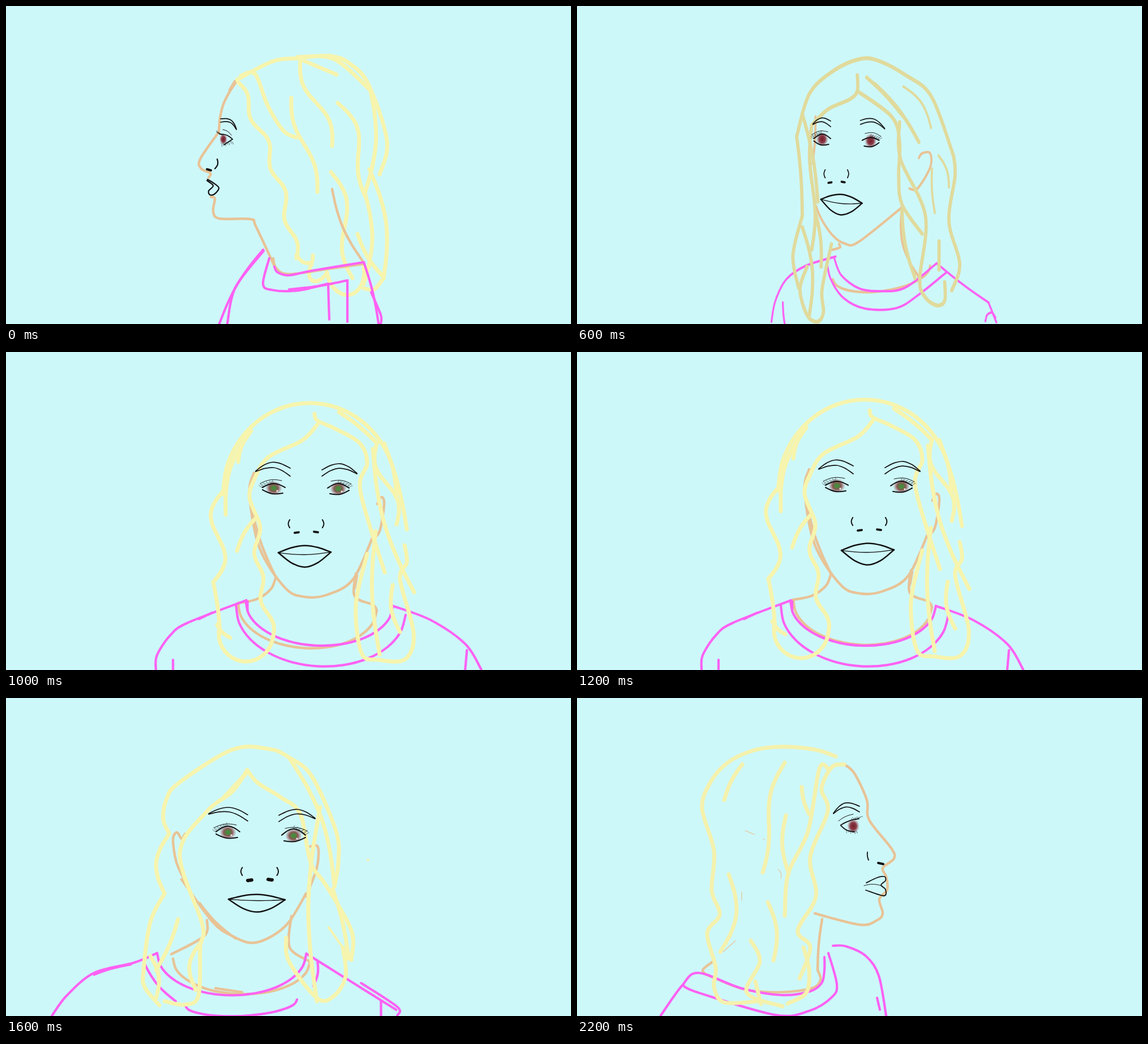
Write an HTML page that moves like this. It is 998 by 561 pixels and loops after 2.4 s.

```html
<!DOCTYPE html>
<html lang="en">
<head>
<meta charset="utf-8">
<title>Turning head</title>
<style>
html, body { margin: 0; width: 100%; height: 100%; overflow: hidden; background: #cdf8fa; }
svg { display: block; width: 998px; height: 561px; }
.line { fill: none; stroke-linecap: round; stroke-linejoin: round; }
</style>
</head>
<body>
<svg id="stage" viewBox="0 0 998 561">
  <defs>
    <radialGradient id="red">
      <stop offset="0" stop-color="#74202c"/><stop offset=".5" stop-color="#8a3a46"/>
      <stop offset="1" stop-color="#a8727c" stop-opacity="0"/>
    </radialGradient>
    <radialGradient id="green">
      <stop offset="0" stop-color="#3f9040"/><stop offset=".3" stop-color="#55803f"/>
      <stop offset=".5" stop-color="#8a5553"/><stop offset="1" stop-color="#a8727c" stop-opacity="0"/>
    </radialGradient>
  </defs>
</svg>
<script>
const stage = document.getElementById('stage');
const HOLD = 200, COUNT = 12;
const ORDER = ['skin', 'shirt', 'hair', 'ink'];
const COLORS = { skin: '#e8c396', shirt: '#fc62f3', hair: '#f6f4ad', ink: '#111' };
const poses = [];
let layers;

function add(parent, tag, attrs) {
  const el = document.createElementNS('http://www.w3.org/2000/svg', tag);
  for (const k in attrs) el.setAttribute(k, attrs[k]);
  parent.append(el);
  return el;
}

// Smooth curve through a few points.
function curve(text) {
  const p = text.split(' ').map(s => s.split(',').map(Number));
  const at = i => p[Math.max(0, Math.min(p.length - 1, i))];
  let d = 'M' + p[0];
  for (let i = 0; i < p.length - 1; i++) {
    const [a, b, c, e] = [at(i - 1), at(i), at(i + 1), at(i + 2)];
    const c1 = b.map((v, k) => v + (c[k] - a[k]) / 6);
    const c2 = c.map((v, k) => v - (e[k] - b[k]) / 6);
    d += `C${c1} ${c2} ${c}`;
  }
  return d;
}

// Points beside a straight line; positive offsets lie right of a downward line, above a rightward one.
function beside(x0, y0, x1, y1, steps, along, offset) {
  const dx = x1 - x0, dy = y1 - y0, len = Math.hypot(dx, dy);
  return Array.from({ length: steps + 1 }, (_, i) => {
    const t = along(i / steps), o = offset(t) / len;
    return `${(x0 + dx * t + dy * o).toFixed(1)},${(y0 + dy * t - dx * o).toFixed(1)}`;
  }).join(' ');
}

// Bowed line with an optional ripple of n half waves.
function strand(x0, y0, x1, y1, bow = 0, ripple = 0, n = 2) {
  return beside(x0, y0, x1, y1, ripple ? n * 4 : 4, t => t,
    t => bow * Math.sin(Math.PI * t) + ripple * Math.sin(Math.PI * n * t));
}

// Half ellipse over a base line.
function arc(x0, y0, x1, y1, h) {
  return beside(x0, y0, x1, y1, 10, u => (1 - Math.cos(Math.PI * u)) / 2,
    t => h * 2 * Math.sqrt(Math.max(0, t * (1 - t))));
}

function draw(layer, width, strokes) {
  for (const s of strokes) add(layers[layer], 'path', { d: curve(s), 'stroke-width': width });
}
const skin = (...s) => draw('skin', 4.5, s);
const shirt = (...s) => draw('shirt', 4.2, s);
const hair = (...s) => draw('hair', 7, s);
const ink = (width, ...s) => draw('ink', width, s);

function iris(x, y, rx, ry, fill) {
  add(layers.ink, 'ellipse', { cx: x, cy: y, rx, ry, fill: `url(#${fill})`, stroke: 'none' });
}

function lashes(x0, y0, x1, y1, n, dx, dy) {
  for (let i = 0; i < n; i++) {
    const t = i / (n - 1), x = x0 + (x1 - x0) * t, y = y0 + (y1 - y0) * t;
    ink(.6, strand(x, y, x + dx * (.5 + t), y + dy * (1 - .3 * (i % 2)), 1));
  }
}

// From the outer end inwards; the lower line ends a gap below the upper one.
function brow(x0, y0, x1, y1, h, gap = 10) {
  const up = h * Math.sign(x1 - x0);
  ink(1.7, strand(x0, y0, x1, y1, up), strand(x0, y0 + 1, x1, y1 + gap, up * .85));
}

// side: -1 when the outer corner is on the left, 1 on the right
function eye(x, y, w, h, side, fill) {
  const outer = x + side * w, inner = x - side * w;
  iris(x, y + 1, fill === 'green' ? 15 : 13, 13, fill);
  if (fill === 'green') add(layers.ink, 'circle', { cx: x + 6, cy: y + 6, r: 1.6, fill: '#eee', stroke: 'none' });
  ink(2, strand(x - w, y, x + w, y, h), strand(outer, y + 4, inner + side * 4, y + 10, 4 * side));
  ink(1, strand(outer + side * 4, y - 7, inner + side * 6, y - 12, -4 * side));
  lashes(x, y - h, outer, y, 10, 4 * side, -6);
}

function nose(x, y, w, width = 3.8) {
  for (const side of [-1, 1]) {
    ink(width, strand(x + side * w - 3, y - side, x + side * w + 4, y));
    const wing = x + side * w * 1.7;
    ink(2, strand(wing, y - 22, wing, y - 8, 2.5 * side));
  }
}

function lips(x0, y0, x1, y1, up, down, part) {
  ink(2.5, strand(x0, y0, x1, y1, up), strand(x0, y0, x1, y1, -down));
  ink(1.3, strand(x0, y0, x1, y1, -part));
}

function pose(index, order = ORDER, tint = {}) {
  const g = add(stage, 'g', { visibility: 'hidden' });
  layers = {};
  for (const name of order) layers[name] = add(g, 'g', { class: 'line', stroke: tint[name] || COLORS[name] });
  poses[index] = { g, order };
}

// Held in-between pose: a neighbour with its layers moved apart.
function shift(index, from, moves) {
  const { g, order } = poses[from];
  const copy = g.cloneNode(true);
  order.forEach((name, i) => copy.children[i].setAttribute('transform', moves[name] || moves.head));
  stage.append(copy);
  poses[index] = { g: copy, order };
}

// Left profile, eye open
pose(0, ['hair', 'skin', 'shirt', 'ink']);
hair('408,130 470,98 515,92 570,88 605,100 640,138 673,238 660,297', '515,90 580,94 645,150',
  strand(643, 145, 634, 330, 15), strand(634, 330, 632, 490, 14),
  strand(642, 288, 667, 480, 17), '667,480 650,500 632,498',
  strand(408, 133, 513, 445, 14, 7, 7), '513,440 525,452 540,452 542,440',
  '415,123 440,120 462,175 490,220 513,232', strand(520, 95, 576, 247, 0, -11), strand(527, 97, 584, 121),
  strand(504, 162, 550, 328, 0, -8), strand(586, 171, 634, 335, 14, 10), strand(574, 293, 612, 480, 6, 13),
  arc(540, 455, 567, 470, -25), arc(567, 470, 632, 460, -45), strand(621, 402, 667, 478, -6));
skin(strand(405, 136, 376, 222, -8), strand(404, 133, 395, 148), '376,222 343,270 345,287 361,295 358,303',
  '362,337 369,340 366,362 377,375 432,376 442,390 478,467', '472,445 477,462 500,473 575,463 632,455',
  strand(576, 323, 630, 450, -9));
shirt(strand(454, 430, 377, 560, -8), '455,432 405,497 391,560', '465,445 454,490 470,501 515,502 568,490',
  strand(500, 500, 603, 484, -2), strand(603, 484, 603, 557), strand(569, 490, 571, 553),
  '474,460 480,470 500,475 540,467 632,452', strand(632, 452, 658, 560, 3), '645,505 662,545 662,560');
iris(384, 235, 7, 10, 'red');
brow(407, 217, 379, 199, 8, 6);
ink(1.7, strand(377, 226, 400, 235, 3), strand(400, 235, 385, 245));
ink(1, strand(383, 218, 398, 228, 2));
ink(2.2, strand(373, 270, 369, 287, 3), '356,306 366,312 376,321 368,332 360,333 358,326 366,317 355,308');
ink(4, strand(355, 288, 362, 290));
lashes(374, 224, 384, 228, 7, -4, -4);
lashes(380, 242, 397, 238, 7, 3, 6);

// Left profile, eye closed
pose(2);
hair('415,120 500,93 550,93 595,120 630,135 647,165 643,210', strand(418, 116, 530, 90, 2), strand(548, 92, 600, 122, 2),
  '415,120 425,165 480,205 492,240 485,345 500,440', '418,120 428,180 475,195 497,215 498,280',
  strand(498, 280, 520, 505, 22), '460,120 480,125 540,190 547,240 583,321', strand(490, 400, 543, 512, -14),
  strand(548, 335, 582, 525, -2, -5), strand(601, 125, 612, 323, -3, 9), strand(603, 130, 598, 260, 9),
  '645,195 612,300 652,375 622,455 590,522', strand(645, 215, 614, 305),
  '645,210 656,345 664,400 645,505 575,525 560,515 520,520 518,490');
skin(strand(410, 122, 371, 212, -9), '371,212 328,263 333,278 347,287 339,295 342,300',
  '343,320 350,330 346,355 358,366 400,370 455,460', '534,251 573,255 555,305 504,315',
  strand(566, 320, 608, 433, -13));
shirt(strand(432, 413, 388, 493, -11), strand(401, 481, 370, 537, -3), '442,440 438,492 465,507 510,500 630,460',
  '448,451 452,465 470,472 500,475', strand(515, 470, 615, 434), strand(580, 441, 615, 435),
  strand(615, 436, 662, 535, 6), strand(608, 470, 625, 535));
draw('shirt', 1.5, [strand(405, 471, 385, 493), strand(372, 535, 358, 557), strand(441, 490, 515, 491, -13),
  strand(662, 535, 668, 560), strand(625, 530, 633, 560)]);
brow(421, 202, 380, 191, 11, 8);
ink(1.7, strand(388, 229, 412, 230, -2));
ink(1, strand(413, 211, 422, 214), strand(368, 264, 369, 275, 2), strand(346, 306, 374, 311));
ink(3, strand(344, 276, 353, 277));
ink(2.4, '341,293 375,312 360,320 345,322 338,315 339,307 346,305 341,293');
lashes(386, 230, 409, 232, 14, -2, 7);

// Three-quarter view
pose(4, ORDER, { hair: '#e0da9c' });
hair('517,122 517,150 500,165 455,182 420,210', strand(420, 210, 420, 430, 2, -6),
  '517,150 590,195 607,240 605,300 612,350 655,402', '388,230 415,155 465,115 520,94 560,96 620,122 675,160 722,265',
  '722,265 725,300 712,380 735,455 718,502', strand(388, 230, 400, 370, 3), '400,370 380,440 392,497',
  strand(400, 190, 433, 345, 6), strand(428, 365, 440, 460, 5), strand(400, 390, 415, 545, 14),
  '410,460 395,500 410,545 432,557 445,540 442,500 462,420', strand(537, 126, 615, 195, 3),
  strand(555, 138, 648, 240, 7), '607,205 609,270 662,370 650,480 660,512 685,528 703,520 703,487',
  strand(612, 360, 640, 480, -7), strand(691, 415, 691, 465));
draw('hair', 4.5, [strand(615, 142, 674, 215, 12), strand(690, 264, 712, 320, 7), strand(676, 287, 682, 365, -3)]);
skin(strand(428, 195, 422, 278, 2), '427,348 440,375 465,405 490,419 520,416 614,354', strand(612, 354, 648, 478, -17),
  '648,268 655,260 672,260 672,285 645,322 628,322', '460,431 480,426 478,420', arc(465, 482, 672, 458, -33));
shirt('306,557 315,520 340,482 385,458 452,442', strand(332, 523, 336, 560, -1),
  '432,447 440,480 470,515 520,534 590,533 640,510 704,470', '449,445 465,475 505,498 550,503 610,497 682,454',
  strand(682, 454, 800, 523, -2), '800,523 818,558', '793,556 797,545 808,541 816,550');
brow(432, 208, 470, 203, 8);
brow(585, 216, 533, 202, 10, 7);
eye(452, 234, 18, 8, -1, 'red');
eye(555, 237, 18, 5, 1, 'red');
nose(482, 311, 14);
lips(449, 341, 537, 348, 12, 24, 4);

// Front view
pose(6);
hair(arc(355, 245, 662, 245, 161), strand(405, 133, 360, 281, -16), strand(405, 133, 382, 188, -5),
  strand(355, 240, 338, 400, 0, -17), strand(338, 400, 350, 490, 2), arc(348, 485, 444, 495, -50),
  strand(415, 285, 444, 495, -9, 6, 5), '522,122 495,150 435,180 410,220 402,250 415,285', strand(415, 285, 380, 345, -5),
  '517,103 522,115 555,130 597,155 610,190 598,240 641,383', strand(345, 475, 368, 498, -3),
  strand(560, 100, 627, 155, 3), strand(627, 155, 662, 298, 0, -12), strand(640, 155, 680, 307, 5),
  strand(620, 165, 693, 418, -17), '610,350 590,440 600,525 630,537 677,536 692,490 668,395 680,365 676,335',
  strand(655, 405, 668, 488, -9), strand(625, 310, 632, 528, -10));
skin('410,207 402,245 420,340 465,410 500,426 540,422 585,395 620,320', strand(405, 265, 448, 390, -5),
  '628,262 635,250 640,262 632,310 618,325', '449,390 440,412 415,430 382,437', '590,385 588,425 620,440 627,450',
  arc(382, 437, 627, 450, -73), strand(592, 388, 588, 410));
shirt('220,560 222,535 245,500 275,478 378,438', strand(295, 471, 318, 460), strand(250, 543, 250, 560),
  arc(360, 447, 656, 464, -99), arc(377, 440, 634, 448, -74), strand(380, 440, 380, 457),
  '634,448 700,473 760,515 788,560', strand(763, 526, 760, 560));
brow(427, 206, 488, 201, 13, 14);
brow(606, 210, 544, 204, 14, 11);
eye(459, 235, 20, 7, -1, 'green');
eye(573, 236, 19, 8, 1, 'green');
nose(516, 314, 17);
lips(467, 350, 560, 349, 12, 26, 4);

// Front view, turning right
pose(7);
hair('333,238 323,215 328,180 350,150 445,91 510,90 545,105 585,138 628,235 632,290 625,333',
  strand(545, 105, 625, 330, 18), '471,127 445,165 400,200 352,275 392,400 388,440 385,525 360,541 325,535',
  strand(472, 130, 430, 175), '471,127 490,150 530,175 565,205 583,290 610,330 655,410 655,462',
  strand(333, 240, 325, 345, -19), '325,345 300,395 288,480 290,510 316,542', strand(349, 390, 310, 480, 4),
  strand(300, 455, 310, 530, 10), strand(390, 430, 380, 515, -16), strand(600, 192, 594, 535, -18),
  '540,423 545,465 595,530 625,525 645,490 640,440', strand(622, 337, 650, 460, 4));
draw('hair', 4, [strand(640, 440, 615, 405), strand(684, 286, 685, 286)]);
skin('361,240 355,248 347,237 340,250 346,290 360,320', '355,320 410,395 445,420 480,432 515,420 545,395 575,345',
  strand(387, 362, 450, 424, -4), '582,262 596,263 594,300 575,350', '400,392 395,420 337,452',
  '549,385 546,440 582,465', arc(340, 460, 582, 465, -60), strand(415, 512, 462, 519));
shirt('150,560 175,525 222,485 290,467 330,450', strand(222, 488, 285, 470, 2), arc(330, 450, 586, 451, -74),
  strand(586, 451, 740, 550), '680,503 742,545 742,560', strand(714, 535, 714, 560), strand(308, 468, 362, 535, -6),
  arc(378, 542, 570, 532, -24), strand(605, 464, 598, 508, 4));
brow(384, 210, 453, 212, 12, 11);
brow(572, 218, 508, 213, 13, 11);
eye(418, 242, 21, 10, -1, 'green');
eye(534, 248, 21, 11, 1, 'green');
nose(474, 327, 18, 6);
lips(419, 361, 519, 362, 9, 22, 2);

// Facing right, eyes closed
pose(9);
hair('250,215 247,185 265,145 300,112 350,85 430,76 470,95 520,145 545,180 556,245', strand(290, 122, 235, 305, -12),
  '448,107 435,120 385,140 357,180 355,210 369,250', strand(369, 260, 345, 520, 0, -11, 4), strand(345, 520, 320, 531),
  '448,107 470,130 530,180 538,230 540,315', strand(361, 128, 314, 280, -3, -5), strand(305, 193, 302, 345, 0, -10),
  '245,225 225,270 220,350 241,385 225,500 240,522 295,530 320,517', strand(230, 485, 268, 517, -12),
  strand(326, 363, 326, 493, 15), strand(297, 410, 302, 513, -26),
  '530,180 564,270 558,320 567,365 555,400 563,490 535,510', strand(527, 290, 514, 455, -6),
  '468,440 468,490 480,515 510,528 548,520');
skin(strand(361, 128, 335, 165, -3), strand(515, 158, 524, 235, 8), '521,255 525,310 514,375 475,422 455,427 385,398',
  '291,245 275,227 255,222 247,250 275,308 290,308 293,297', '275,312 293,340 300,380 298,420 250,446',
  '457,427 457,440 485,452', '220,460 230,490 270,520 360,537 430,527 480,500', strand(220, 465, 233, 493));
shirt(strand(38, 559, 210, 466, 14), strand(179, 480, 280, 560, -6), strand(212, 468, 287, 525, -7),
  '333,536 380,539 430,528 470,505 485,480 485,451', '498,458 503,515 480,535 447,559',
  '501,457 590,500 615,525 630,560', strand(611, 527, 612, 557));
brow(376, 181, 441, 180, 11);
ink(1.5, strand(491, 191, 521, 187, 1), strand(486, 206, 527, 205, 3));
ink(2.6, strand(378, 195, 400, 195), strand(383, 221, 430, 226, -3), strand(410, 228, 425, 228), strand(518, 221, 525, 226));
ink(3.5, strand(488, 237, 525, 249), strand(500, 241, 522, 247));
lips(415, 339, 501, 343, 18, 28, 2);

// Right profile
pose(11, ORDER, { hair: '#f4f1ad' });
hair('457,103 420,91 360,86 310,93 265,115 235,150 221,195 242,270 238,340 252,382 230,415 245,475 242,510 260,537 320,535',
  strand(292, 117, 260, 180, -4), strand(367, 114, 328, 308, -9, -7),
  '472,117 450,122 432,160 443,200 412,280 422,350 390,410 412,440 393,495',
  '444,125 428,125 408,235 373,310 367,384', strand(397, 157, 410, 205, -3), strand(369, 207, 374, 310, -9),
  strand(268, 311, 253, 448, 21), strand(337, 360, 347, 463, 11), '307,428 323,465 300,520 363,544',
  strand(315, 500, 325, 540), '400,440 410,480 405,520 372,539');
skin('472,117 490,133 512,180 516,215 555,265 560,283 540,300 546,315 548,338 534,355 540,380 530,392 500,400 420,380',
  strand(433, 390, 425, 480, -2), '425,480 430,497 415,512 360,519 300,515 250,497 222,482 240,465');
draw('skin', 1.2, [strand(297, 234, 314, 241), strand(329, 249, 331, 250), strand(355, 302, 360, 318, 3),
  strand(291, 342, 291, 357), strand(280, 428, 258, 448)]);
shirt('148,560 185,508 215,485 290,512 360,524 410,518 432,503 437,480 437,457',
  '187,507 215,520 350,559 410,552 450,528 459,505 444,450', '452,437 475,438 510,455 533,490 546,560',
  strand(530, 529, 535, 550));
iris(488, 226, 11, 13, 'red');
brow(453, 203, 499, 191, 12);
ink(1.8, strand(466, 224, 498, 213, 2), strand(466, 225, 490, 236, -3), strand(513, 272, 515, 286, -1),
  '511,326 530,317 543,315 545,322 537,330 545,338 542,349 510,339');
ink(1, strand(462, 217, 488, 205, 2), strand(507, 331, 540, 332, 3));
ink(4, strand(532, 291, 541, 293));
lashes(485, 215, 497, 213, 5, 5, -4);
lashes(475, 233, 492, 235, 6, 2, 5);

shift(1, 2, { head: 'translate(5 -3)' });
shift(3, 4, { head: 'translate(66 0) scale(.83 1)', ink: 'translate(58 0) scale(.83 1)', shirt: 'translate(106 0) scale(.776 1)' });
shift(5, 6, { head: 'translate(28 6)', ink: 'translate(14 4)', shirt: 'translate(42 0) scale(1.012 1)' });
shift(8, 7, { head: 'translate(-45 0)', ink: 'translate(-26 -6)', shirt: 'translate(-73 0) scale(1.03 1)' });
shift(10, 9, { head: 'translate(8 4) scale(.97 1)', ink: 'translate(8 2)', shirt: 'translate(31 0) scale(.88 1)' });

let shown = -1;
function tick() {
  const now = Math.floor(performance.now() / HOLD) % COUNT;
  if (now !== shown) {
    poses.forEach((p, i) => p.g.setAttribute('visibility', i === now ? 'visible' : 'hidden'));
    shown = now;
  }
  requestAnimationFrame(tick);
}
tick();
</script>
</body>
</html>
```
